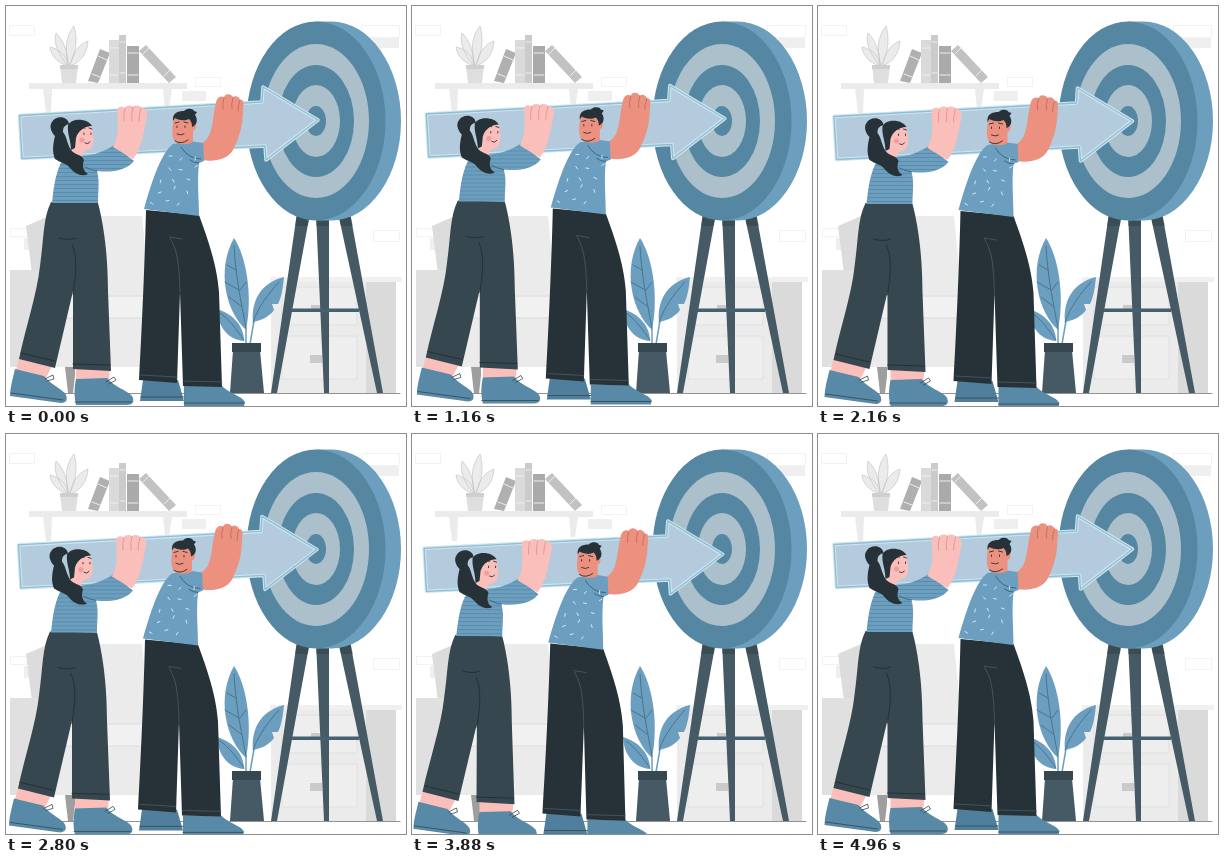
Recreate the animation shown at these times as an HTML page. Size 400 by 400 pixels, loop 5000 ms.

```html
<!DOCTYPE html>
<html lang="en">
<head>
<meta charset="utf-8">
<title>Hitting the target</title>
<style>
  html, body { margin: 0; width: 100%; height: 100%; overflow: hidden; background: #fff; }
  svg { display: block; width: 100%; height: 100%; }
  .line { fill: none; stroke-linecap: round; stroke-linejoin: round; }
  .blue { fill: #5889a6; }
  .shirt { fill: #6b9ebf; }
  .ink { fill: #263238; }
  .slate { fill: #37474f; }
  .steel { fill: #455a64; }
  .rose { fill: #fbbfbb; }
  .tan { fill: #ec907f; }
</style>
</head>
<body>
<svg viewBox="0 0 400 400">
  <defs>
    <pattern id="stripes" width="8" height="4" patternUnits="userSpaceOnUse">
      <path fill="#6b9ebf" d="M0 0h8v4H0z"/><path fill="#54849f" d="M0 2h8v.7H0z"/>
    </pattern>
  </defs>

  <g id="room">
    <g fill="#fff" stroke="#f2f2f2">
      <path d="M3.500 19.500h25v10h-25zM355.500 19.500h38v12h-38zM189.500 71.500h25v9h-25zM4.500 222.500h18v8h-18zM367.500 224.500h26v11h-26z"/>
    </g>
    <path fill="#efefef" d="M366 32h27v10h-27zM176 85h24v10h-24zM18 232h18v12H18z"/>
    <path fill="#ebebeb" d="M23 77h158v6H23zM37 83h9l-1 24h-5zM157 83h9l-3 20h-4z"/>

    <g fill="#ebebeb" stroke="#c6c6c6" stroke-width=".7">
      <path d="M62 60C52 57 45 50 44 41 54 43 61 50 62 60zM62 60C53 49 47 38 50 27 58 35 62 46 62 60zM63 60C58 43 60 30 68 20 72 33 70 48 63 60zM64 60C67 46 72 39 82 35 81 48 75 56 64 60z"/>
    </g>
    <path fill="#dedede" d="M54 59h18l-2 18H56z"/><path fill="#cfcfcf" d="M54 59h18v4H54z"/>
    <path fill="#b0b0b0" d="M94 43l10 4-12 30-10-2z"/>
    <path fill="#dadada" d="M103 34h10v43h-10z"/>
    <path fill="#cbcbcb" d="M113 29h7v48h-7z"/>
    <path fill="#aaa" d="M121 40h12v37h-12z"/>
    <path fill="#c2c2c2" d="M133 45l7-6 30 32-7 6z"/>
    <path class="line" stroke="#eee" d="M104 42h8M104 69h8M114 36h5M114 67h5M122 47h10M122 69h10M137 48l6-6M158 70l6-6M92 50l9 4M86 68l8 3"/>

    <path fill="#ebebeb" d="M42 210h94l8 80v71H30z"/>
    <path fill="#dcdcdc" d="M20 220l23-10-5 54-12 4z"/>
    <path fill="#e0e0e0" d="M4 264h40v97H4z"/>
    <path fill="#f1f1f1" d="M44 290h100v22H44z"/>
    <path class="line" stroke="#dcdcdc" d="M44 290h100M44 312h100"/>
    <path fill="#9e9e9e" d="M59 361h10v9l-2 17h-5z"/>

    <path fill="#ebebeb" d="M265 274h96v113h-96z"/>
    <path fill="#dadada" d="M360 276h30v111h-30z"/>
    <path fill="#f0f0f0" d="M264 271h132v5H264z"/>
    <path fill="#eee" stroke="#e0e0e0" d="M276 281h75v38h-75zM276 330h75v43h-75z"/>
    <path fill="#cacaca" d="M305 299h11v7h-11zM304 349h12v8h-12z"/>
    <path class="line" stroke="#777" stroke-width=".8" d="M48 387.500h346"/>
  </g>

  <g id="plant">
    <g class="shirt">
      <path d="M240 324C220 306 210 264 228 232 240 250 247 288 240 324z"/>
      <path d="M247 316C245 296 254 277 278 271 277 280 276 290 272 298L266 298 268 304C263 311 256 314 247 316z"/>
      <path d="M238 335C223 334 212 322 211 303 227 308 238 320 238 335z"/>
    </g>
    <path class="line" stroke="#6b9ebf" stroke-width="1.500" d="M240 322v16M248 315l-4 23"/>
    <path class="line" stroke="#3f6b86" stroke-width=".8" d="M240 322C236 300 230 275 228 240M247 316C253 300 262 288 273 276M238 334C231 324 223 313 214 307M235 300l-12-9M233 284l-14-8M230 264l-9-5M234 284l6-8"/>
    <path class="steel" d="M227 344h27l4 43h-34z"/><path class="slate" d="M226 337h29v9h-29z"/>
  </g>

  <g id="target">
    <path class="steel" d="M291 207h13l-33 180h-6zM310 207h13v180h-5zM332 207h12l33 180h-6z"/>
    <path class="ink" opacity=".35" d="M291 207h13l-2 13h-13zM310 207h13v13h-13zM332 207h12l3 13h-12z"/>
    <path fill="#45606f" d="M286 302.500h67v3.500h-67z"/>
    <path fill="#6c9fbd" d="M310 15.500h15.500a69.500 99.500 0 0 1 0 199H310z"/>
  </g>

  <g id="team">
    <path id="arrow" fill="#b3cbdc" stroke="#cfe5ef" stroke-width="3.500" stroke-linejoin="round" d="M13.500 109.500L256 96 257 81 312 114 260 154 259 140 16 152.500z"/>
    <path fill="none" stroke="#8fbfd5" stroke-width="1.400" stroke-linejoin="round" d="M13.500 109.500L256 96 257 81 312 114 260 154 259 140 16 152.500z"/>

    <g id="woman">
      <path class="rose" d="M13 352l33 8-6 12-30-8zM70 362h34l-1 12H70z"/>
      <path class="blue" d="M9 363l29 7C46 380 57 383 60 389 62 394 60 397 55 397L4 390C4 381 7 372 9 363zM70 373l31-1C108 381 121 384 126 390 129 395 127 399 121 399H70C68 391 68 382 70 373z"/>
      <path class="line" stroke="#37474f" stroke-width=".8" d="M5 387l52 7M69 396h56M39 373l8-4 1 4-7 2M100 376l8-5 2 3-7 4"/>
      <path class="slate" d="M45 196L92 197C96 212 102 242 102 285L105 365 67 363 67 285 49 362 13 353C20 320 31 288 34 260 38 232 37 212 45 196z"/>
      <path class="line" stroke="#1f2b31" stroke-width=".8" d="M66 238C72 252 70 268 67 288M53 232q10 3 17 0M15 347l34 8M67 358l37 1"/>
      <path fill="url(#stripes)" d="M57 153C50 165 48 178 46 197H92C92 184 94 176 91 165 106 167 121 164 128 155L108 139C98 146 87 149 78 150z"/>
      <path class="line" stroke="#37617c" stroke-width=".8" d="M91 165q-7-1-12-4"/>
      <path class="rose" d="M111 105C112 99 117 101 119 102 120 99 125 99 127 101 129 99 134 99 135 102 139 101 142 105 141 110 138 124 136 142 127 153L107 141C113 131 112 118 111 105z"/>
      <path class="line" stroke="#e48d89" stroke-width=".8" d="M119 102q-2 7-1 13M127 101q-2 7-1 14M135 102q-2 7-2 13"/>
      <path class="rose" d="M64 122C67 115 82 114 86 121 88 130 89 139 84 143 80 145 77 144 76 150L67 153 65 138z"/>
      <path class="ink" d="M63 118C62 110 50 109 46 116 43 120 45 126 49 130 47 138 46 146 49 153 55 157 60 157 64 162 69 168 76 171 82 168 77 165 76 160 78 154 76 148 68 149 65 144 61 138 61 131 57 126 57 120 60 119 63 118z"/>
      <path class="ink" d="M62 119C66 112 81 112 86 120 78 120 72 125 70 132L69 142 65 144C65 134 61 128 62 119z"/>
      <circle cx="76" cy="134" r="2.500" fill="#ef8583" opacity=".6"/>
      <path class="line" stroke="#263238" stroke-width=".9" d="M75 123q2-2 4-1M83 122l3 1M78 127v1.500M85 127v1.500M79 137q3 2 5-1"/>
    </g>

    <g id="man">
      <path class="blue" d="M178 380h38C224 388 236 390 239 396L238 400H178z"/>
      <path fill="#4f7f9c" d="M137 374h35l6 21H134z"/>
      <path class="line" stroke="#37474f" stroke-width=".8" d="M135 391h43M178 397h60"/>
      <path class="ink" d="M140 204L193 209C199 226 211 256 213 286L216 381 177 380 174 286 171 377 133 374C136 322 139 250 140 204z"/>
      <path class="line" stroke="#50626c" stroke-width=".7" d="M164 232C173 246 173 264 174 286M164 231l12 2M135 369l36 2M178 375l38 1"/>
      <path class="tan" d="M196 137C208 131 206 111 210 97 211 90 216 90 218 91 220 87 225 88 227 91 229 89 234 91 234 94 238 93 238 98 237 104 237 120 233 132 227 144 221 154 208 156 196 154z"/>
      <path class="line" stroke="#c0685a" stroke-width=".8" d="M218 92q-2 6-1 11M227 92q-2 6-1 11M234 94q-2 6-2 11"/>
      <path class="shirt" d="M167 138C156 146 147 171 138 203L193 210C193 192 191 176 193 157L198 155 197 137 184 135z"/>
      <path class="line" stroke="#37617c" stroke-width=".9" d="M175 141q7 12 20 12M193 157q-5 0-9-3"/>
      <g id="dashes" class="line" stroke="#e4eff5" stroke-width=".9"/>
      <path class="tan" d="M168 112C174 107 185 107 187 116 191 117 191 124 187 125L187 136C182 139 174 139 170 136 165 133 166 120 168 112z"/>
      <path class="ink" d="M167 115C166 107 172 105 178 105 182 101 188 103 188 105L191 106 189 109C192 113 191 118 188 120L186 121C186 117 185 115 183 113 177 116 171 113 169 112z"/>
      <path class="line" stroke="#263238" stroke-width=".9" d="M169 117l4-1M178 116l4 1M171 120v1.500M179 120v1.500M171 128q4 2 7 0M169 135q6 4 13-1"/>
    </g>
  </g>
</svg>
<script>
const NS = "http://www.w3.org/2000/svg";
const LOOP = 5000;
const byId = id => document.getElementById(id);

function add(parent, tag, attrs) {
  const el = document.createElementNS(NS, tag);
  for (const k in attrs) el.setAttribute(k, attrs[k]);
  parent.append(el);
}

[[69.5, 99.5], [53, 77], [38, 56], [24, 36], [10, 15]].forEach(([rx, ry], i) =>
  add(byId("target"), "ellipse", { cx: 310, cy: 115, rx, ry, fill: i % 2 ? "#abc0ca" : "#5587a3" }));

for (let i = 0; i < 15; i++) {
  const row = Math.floor(i / 3);
  const x = 163 - row * 4 + (i % 3) * 13 + (row % 2) * 4;
  const y = 150 + row * 11 + (i * 7) % 5;
  const a = i * 2.4;
  add(byId("dashes"), "path", { d: `M${x} ${y}l${3 * Math.cos(a)} ${3 * Math.sin(a)}` });
}

// Drift of the team: time, x, y, degrees
const drift = [
  [0, 0, 0, 0], [480, -1.5, -.5, 0], [1160, .8, -1.5, 0], [1450, 2.2, -1, 0],
  [2160, 2.5, 1, 0], [2800, -1, 1.4, 0], [3360, -3, 3.8, .1], [3700, -2.7, 5, .2],
  [4280, 0, 6, .35], [4700, 2, 3, .1], [4960, 2.5, 1, 0]
];

function slope(i, c) {
  const a = drift[Math.max(i - 1, 0)], b = drift[Math.min(i + 1, drift.length - 1)];
  return (b[c] - a[c]) / (b[0] - a[0]);
}

// Cubic Hermite curve through the drift points
function sample(t, c) {
  let i = 0;
  while (i < drift.length - 2 && t > drift[i + 1][0]) i++;
  const a = drift[i], b = drift[i + 1], span = b[0] - a[0];
  const u = Math.min((t - a[0]) / span, 1), v = 1 - u;
  return a[c] * v * v * (1 + 2 * u) + b[c] * u * u * (3 - 2 * u)
    + span * u * v * (slope(i, c) * v - slope(i + 1, c) * u);
}

function draw() {
  const t = performance.now() % LOOP;
  const [x, y, turn] = [1, 2, 3].map(c => sample(t, c));
  byId("team").setAttribute("transform", `translate(${x} ${y}) rotate(${turn} 160 250)`);
  requestAnimationFrame(draw);
}
draw();
</script>
</body>
</html>
```
